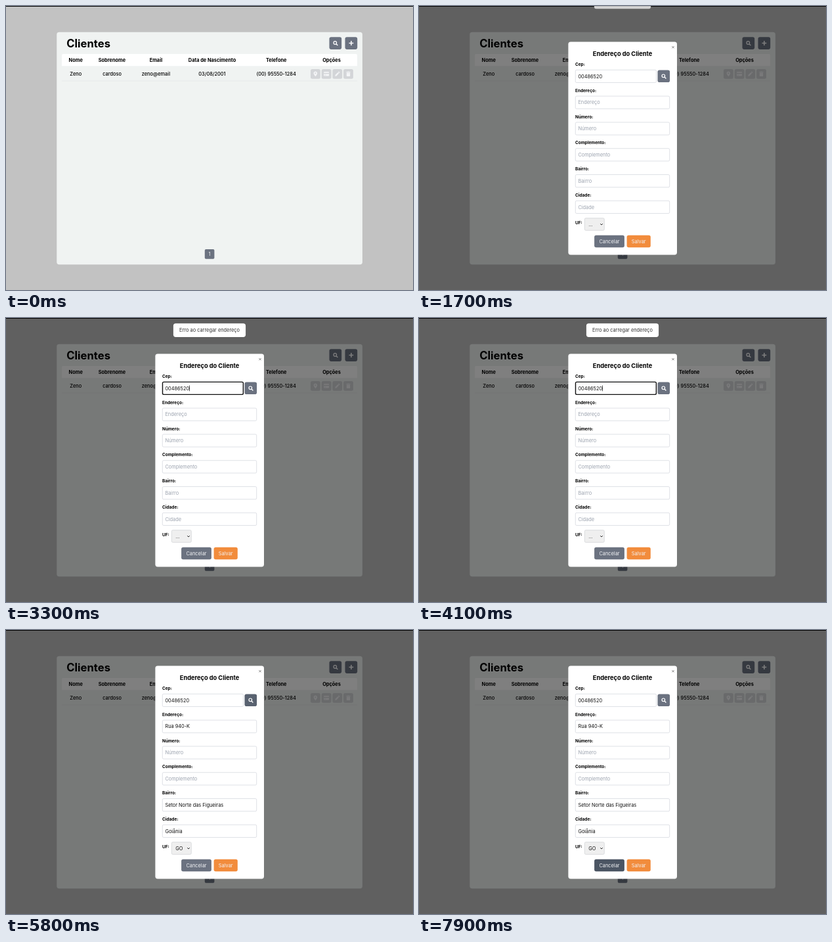
These frames come from a looping animation (620 by 432 pixels, 8 s). An HTML page with a canvas:

```html
<!DOCTYPE html>
<html lang="pt-BR">
<head>
<meta charset="utf-8">
<title>Clientes</title>
<style>
  html, body { margin: 0; width: 100%; height: 100%; overflow: hidden; background: #c2c2c2; }
  canvas { display: block; width: 620px; height: 432px; }
</style>
</head>
<body>
<canvas id="stage" width="620" height="432"></canvas>
<script>
const ctx = document.getElementById('stage').getContext('2d');
const LOOP = 8000, STEP = 100;
const PX = 0.4615; // page zoom
const GRAY = '#6b7280', DARK = '#4b5563', MID = '#596270', PALE = '#f3f4f6';
const BODY = 16 * PX, SMALL = 14 * PX;

const CLIENT = [
  ['Nome', 'Zeno', 106.2],
  ['Sobrenome', 'cardoso', 161.5],
  ['Email', 'zeno@email', 228.4],
  ['Data de Nascimento', '03/08/2001', 314],
  ['Telefone', '(00) 95550-1284', 411.7],
  ['Opções', '', 496]
];
const FIELDS = [
  ['Endereço', 'Rua 940-K'],
  ['Número', ''],
  ['Complemento', ''],
  ['Bairro', 'Setor Norte das Figueiras'],
  ['Cidade', 'Goiânia']
];
const CEP = '00486520';

function text(s, x, cy, size, weight = 400, color = '#000', align = 'left') {
  ctx.font = `${weight} ${size}px Inter, sans-serif`;
  ctx.textAlign = align;
  ctx.fillStyle = color;
  ctx.fillText(s, x, cy + size * 0.364);
}

function box(x, y, w, h, r, fill, stroke, lw = 0.7) {
  ctx.beginPath();
  ctx.roundRect(x, y, w, h, r);
  if (fill) { ctx.fillStyle = fill; ctx.fill(); }
  if (stroke) { ctx.strokeStyle = stroke; ctx.lineWidth = lw; ctx.stroke(); }
}

function line(color, lw, ...pts) {
  ctx.beginPath();
  for (let i = 0; i < pts.length; i += 2) ctx.lineTo(pts[i], pts[i + 1]);
  ctx.strokeStyle = color;
  ctx.lineWidth = lw;
  ctx.stroke();
}

function lens(x, y) {
  ctx.beginPath();
  ctx.arc(x - 0.7, y - 0.7, 2.3, 0, Math.PI * 2);
  ctx.strokeStyle = '#fff';
  ctx.lineWidth = 1.2;
  ctx.stroke();
  line('#fff', 1.4, x + 1, y + 1, x + 3.4, y + 3.4);
}

const icons = [
  function pin(x, y, bg) {
    ctx.beginPath();
    ctx.arc(x, y - 1, 2.8, Math.PI * 0.87, Math.PI * 0.13);
    ctx.quadraticCurveTo(x + 1.9, y + 1.9, x, y + 3.9);
    ctx.quadraticCurveTo(x - 1.9, y + 1.9, x - 2.55, y + 0.1);
    ctx.fill();
    ctx.beginPath();
    ctx.arc(x, y - 1, 1, 0, Math.PI * 2);
    ctx.fillStyle = bg;
    ctx.fill();
  },
  function card(x, y, bg) {
    box(x - 4, y - 3.2, 8, 6.4, 0.9, PALE);
    ctx.fillStyle = bg;
    ctx.fillRect(x - 4, y - 1.5, 8, 1.5);
    ctx.fillRect(x - 3, y + 1.4, 2.6, 0.6);
  },
  function pencil(x, y) {
    line(PALE, 2.3, x - 2.3, y + 2.3, x + 1.5, y - 1.5);
    line(PALE, 2.3, x + 1.9, y - 1.9, x + 3, y - 3);
    ctx.beginPath();
    ctx.moveTo(x - 3.6, y + 3.6);
    ctx.lineTo(x - 3, y + 1.2);
    ctx.lineTo(x - 1.2, y + 3);
    ctx.fill();
  },
  function trash(x, y) {
    ctx.fillRect(x - 3.2, y - 3.2, 6.4, 0.9);
    ctx.fillRect(x - 1.1, y - 3.7, 2.2, 0.8);
    box(x - 2.7, y - 1.8, 5.4, 5.4, [0, 0, 0.9, 0.9], PALE);
  }
];

function drawPage(hoverPin) {
  ctx.fillStyle = '#c2c2c2';
  ctx.fillRect(0, 0, 620, 432);
  ctx.fillStyle = '#000';
  ctx.fillRect(0, 0, 620, 1);
  box(77.3, 39.8, 465.6, 353.4, 3.7, '#f0f3f2');
  text('Clientes', 92.3, 56.7, 36 * PX, 700);
  box(492.5, 47.2, 18.7, 18.7, 2.8, GRAY);
  lens(502, 56.7);
  box(516.5, 47.2, 18.7, 18.7, 2.8, GRAY);
  line('#fff', 1.5, 522.5, 56.5, 529.3, 56.5);
  line('#fff', 1.5, 525.9, 53.1, 525.9, 59.9);

  box(85, 73, 450, 18.3, [2, 2, 0, 0], '#fff');
  for (const [head, cell, x] of CLIENT) {
    text(head, x, 82.6, BODY, 700, '#000', 'center');
    text(cell, x, 103.3, BODY, 500, '#000', 'center');
  }
  ctx.fillStyle = '#e3e6e6';
  ctx.fillRect(85, 113.6, 450, 0.8);

  icons.forEach((icon, i) => {
    const x = 464 + i * 16.7;
    const bg = hoverPin && i === 0 ? '#9ca3af' : '#d3d5d8';
    box(x, 96, 14.8, 14.8, 2.5, bg);
    ctx.fillStyle = PALE;
    icon(x + 7.4, 103.3, bg);
  });

  box(302.8, 370, 14.6, 14.8, 1.8, GRAY);
  text('1', 310, 377.4, BODY, 400, PALE, 'center');
}

function input(y, w, value, hint) {
  box(238.3, y, w, 19.2, 1.8, '#fff', '#d1d5db');
  text(value || hint, 242.4, y + 9.7, BODY, 400, value ? '#111' : '#9ca3af');
}

function button(x, w, label, color) {
  box(x, 348.7, w, 18.6, 2.8, color);
  text(label, x + w / 2, 358, BODY, 400, PALE, 'center');
}

function drawModal(t) {
  ctx.fillStyle = 'rgba(0,0,0,.5)';
  ctx.fillRect(0, 1, 620, 431);
  box(227.4, 54.6, 165.6, 323.8, 3.7, '#fff');
  line('#555', 0.7, 385.4, 61.1, 388.6, 64.3);
  line('#555', 0.7, 388.6, 61.1, 385.4, 64.3);
  text('Endereço do Cliente', 310, 72.3, 20 * PX, 700, '#000', 'center');

  text('Cep:', 238, 88.7, SMALL, 700);
  input(97.3, 123.2, CEP);
  if (t >= 3100 && t < 4700) {
    box(238.5, 97.4, 122.9, 19, 1.8, null, '#101010', 1.4);
    if (t < 3600 || (t >= 4100 && t < 4600)) {
      const end = 242.4 + ctx.measureText(CEP).width;
      line('#000', 0.7, end + 0.4, 102.6, end + 0.4, 111.2);
    }
  }
  const hover = t >= 4700 && t < 7700;
  box(363.5, 97.5, 18.6, 18.6, 2.8, !hover ? GRAY : t < 4900 ? '#626a78' : MID);
  lens(373, 107);

  const filled = t >= 5300;
  FIELDS.forEach(([name, value], i) => {
    const y = 137.1 + i * 39.8;
    text(name + ':', 238, y - 8.7, SMALL, 700);
    input(y, 143.4, filled && value, name);
  });

  text('UF:', 238, 330.1, SMALL, 700);
  box(252.3, 322.7, 30, 18.6, 1.8, '#efefef', '#cfd1d4');
  text(filled ? 'GO' : '...', 258.2, 332.2, BODY, 400, '#111');
  line('#111', 0.9, 276.2, 331.2, 278, 333, 279.8, 331.2);

  button(267.1, 45.8, 'Cancelar', t >= 7900 ? DARK : t >= 7800 ? MID : GRAY);
  button(316.6, 36.2, 'Salvar', '#f28c3c');
}

// Cubic bezier easing, solved by bisection
function bezier(x1, y1, x2, y2) {
  const at = (a, b, u) => 3 * u * (1 - u) * ((1 - u) * a + u * b) + u ** 3;
  return x => {
    if (x <= 0) return 0;
    if (x >= 1) return 1;
    let lo = 0, hi = 1;
    for (let i = 0; i < 24; i++) {
      const m = (lo + hi) / 2;
      if (at(x1, x2, m) < x) lo = m; else hi = m;
    }
    return at(y1, y2, lo);
  };
}
const easeIn = bezier(0.21, 1.02, 0.73, 1);
const easeOut = bezier(0.06, 0.71, 0.55, 1);

function drawToast(t) {
  if (t < 1700 || t >= 5800) return;
  const leaving = t >= 5700;
  const away = leaving ? easeOut((t - 5650) / 400) : 1 - easeIn((t - 1651) / 350);
  const h = 20.7;
  ctx.save();
  ctx.globalAlpha = 1 - away * (leaving ? 1 : 0.5);
  ctx.translate(310, 18.7 - away * h * (leaving ? 1.5 : 2));
  ctx.scale(1 - 0.4 * away, 1 - 0.4 * away);
  box(-55.1, -h / 2, 110.2, h, 3.7, '#fff');
  text('Erro ao carregar endereço', 0, 0, BODY, 400, '#363636', 'center');
  ctx.restore();
}

function frame(now) {
  const t = Math.floor((now % LOOP) / STEP) * STEP;
  drawPage(t >= 700 && t < 1700);
  if (t >= 1700) drawModal(t);
  drawToast(t);
  requestAnimationFrame(frame);
}

let start;
requestAnimationFrame(function begin(now) {
  start = now;
  const tick = n => { frameAt(n - start); requestAnimationFrame(tick); };
  tick(now);
});

function frameAt(ms) {
  const t = Math.floor((ms % LOOP) / STEP) * STEP;
  drawPage(t >= 700 && t < 1700);
  if (t >= 1700) drawModal(t);
  drawToast(t);
}
</script>
</body>
</html>
```
